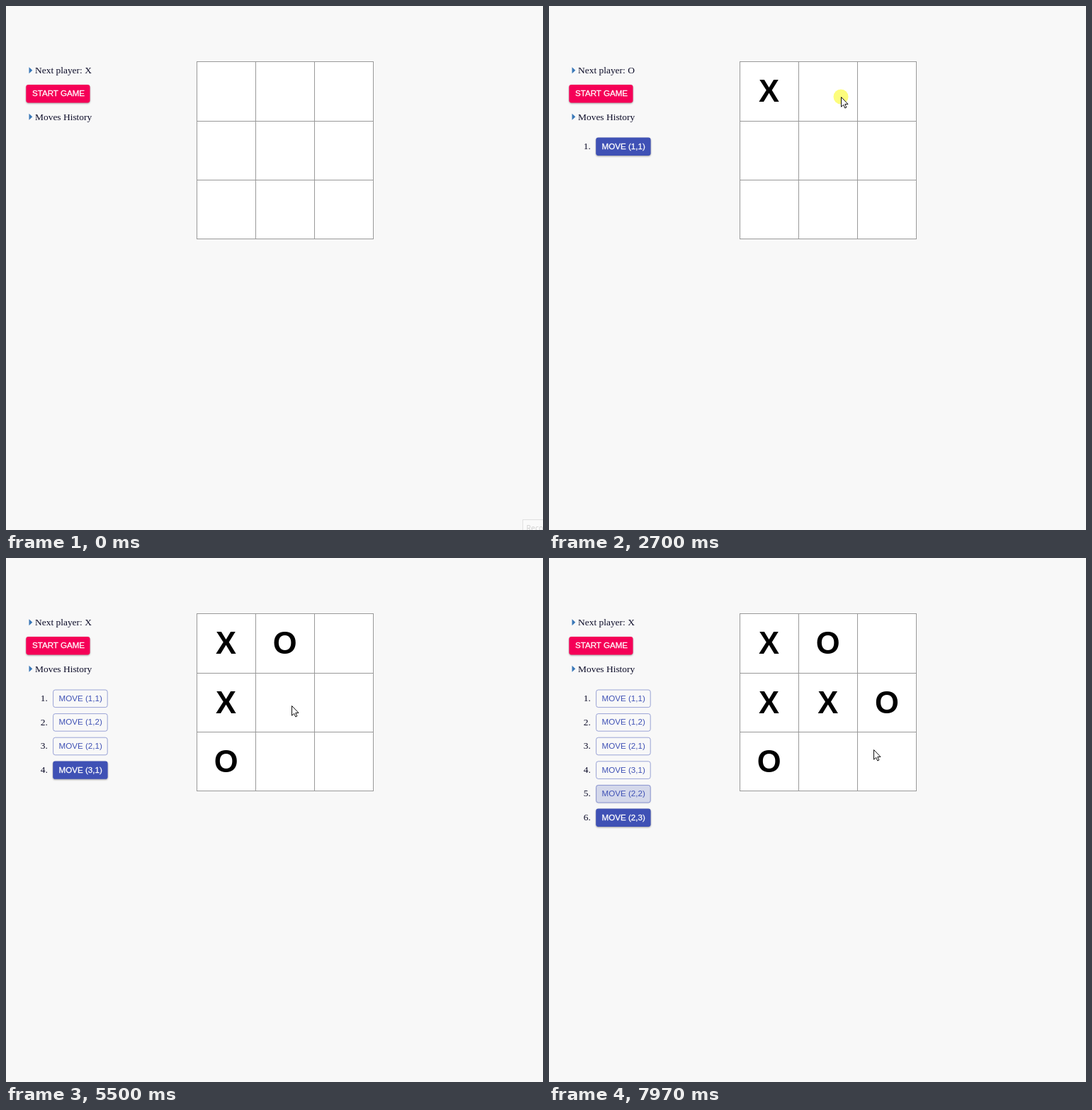
Recreate the animation shown at these times as an HTML page. Size 758 by 739 pixels, loop 8 s.

```html
<!DOCTYPE html>
<html lang="en">
<head>
<meta charset="utf-8">
<title>Tic-tac-toe</title>
<style>
  html, body { margin: 0; width: 100%; height: 100%; overflow: hidden; background: #f8f8f8; }
  svg { display: block; }
  .serif { font: 13.44px "Liberation Serif", serif; fill: #0c0c28; }
  .label { font: 11.6px "Liberation Sans", sans-serif; fill: #3f51b5; }
  .label.light { fill: #fff; stroke: #fff; stroke-width: .3px; }
  .mark { font: bold 43.5px "Liberation Sans", sans-serif; text-anchor: middle; }
  .hint { font: 10.5px "Open Sans", sans-serif; fill: #cfcfcf; }
  .raised { filter: drop-shadow(0 1.2px 1.2px rgba(0, 0, 0, .36)); }
</style>
</head>
<body>
<svg id="stage" width="758" height="739" viewBox="0 0 758 739"></svg>
<script>
const LOOP = 8000;
const BLUE = '#3f51b5';
const BOARD = { x: 269, y: 78.9, pitch: 83.16 };
const ROW = 33.6;
const HOLD = 80;   // press to landing
const FADE = 250;  // filled to outlined button

const moves = [
  { row: 1, col: 1, press: 1705 },
  { row: 1, col: 2, press: 2650 },
  { row: 2, col: 1, press: 3950 },
  { row: 3, col: 1, press: 4800 },
  { row: 2, col: 2, press: 7120 },
  { row: 2, col: 3, press: 7750 }
];

// Pointer trips: when, where to, and an optional point the curve bends towards
const trips = [
  { from: 70, until: 200, to: [494, 647] },
  { from: 340, until: 1450, to: [311, 119], bend: [-175, 310] },
  { from: 1800, until: 2480, to: [412, 128] },
  { from: 2760, until: 3250, to: [317, 205], bend: [400, 215] },
  { from: 3460, until: 3660, to: [327, 214] },
  { from: 4030, until: 4670, to: [306, 289] },
  { from: 4900, until: 5500, to: [403, 208], bend: [340, 415] },
  { from: 5930, until: 6750, to: [403, 191], bend: [337, 810] },
  { from: 7200, until: 7550, to: [452, 214] },
  { from: 7830, until: 7970, to: [458, 270] }
];
trips.forEach((trip, i) => {
  trip.start = i ? trips[i - 1].to : [640, 700];
  trip.bend ||= trip.to.map((v, axis) => (v + trip.start[axis]) / 2);
});

const stage = document.getElementById('stage');

function add(tag, attrs, text = '', parent = stage) {
  const el = document.createElementNS('http://www.w3.org/2000/svg', tag);
  for (const key in attrs) el.setAttribute(key, attrs[key]);
  el.textContent = text;
  return parent.appendChild(el);
}

const write = (cls, x, y, text, parent) => add('text', { class: cls, x, y }, text, parent);

const show = (el, on) => { el.style.display = on ? '' : 'none'; };

const raised = (x, y, width, fill, parent) =>
  add('rect', { class: 'raised', x, y, width, height: 25.4, rx: 3.4, fill }, '', parent);

function summary(y, text) {
  add('path', { d: `M32.5 ${y - 8.7}l4.8 4.5l-4.8 4.5z`, fill: '#3a78b8' });
  return write('serif', 41, y, text);
}

function drawBoard() {
  const edge = (origin, k) => Math.floor(origin + BOARD.pitch * k) + .5;
  const [x0, x3] = [edge(BOARD.x, 0), edge(BOARD.x, 3)];
  const [y0, y3] = [edge(BOARD.y, 0), edge(BOARD.y, 3)];
  let d = '';
  for (let k = 0; k < 4; k++) {
    d += `M${edge(BOARD.x, k)} ${y0 - .5}V${y3 + .5}M${x0 - .5} ${edge(BOARD.y, k)}H${x3 + .5}`;
  }
  add('rect', { x: x0, y: y0, width: x3 - x0, height: y3 - y0, fill: '#fff' });
  add('path', { d, stroke: '#999', fill: 'none' });
}

const status = summary(95, 'Next player: X');
raised(28.3, 111, 90.2, '#f50057');
write('label light', 37, 127, 'START GAME');
summary(160.5, 'Moves History');
drawBoard();

moves.forEach((m, i) => {
  const dy = ROW * i;
  m.land = m.press + HOLD;
  m.mark = write('mark',
    BOARD.x + BOARD.pitch * (m.col - .5),
    BOARD.y + BOARD.pitch * (m.row - .5) + 14.9,
    i % 2 ? 'O' : 'X');
  m.item = add('g', {});
  write('serif', 48.7, 202 + dy, `${i + 1}.`, m.item);
  m.outline = add('rect', {
    x: 66.6, y: 186 + dy, width: 76.6, height: 24.6, rx: 3,
    fill: 'none', stroke: BLUE, 'stroke-opacity': .5
  }, '', m.item);
  m.fill = raised(66.2, 185.6 + dy, 77.4, BLUE, m.item);
  m.label = write('label', 74.6, 201.8 + dy, `MOVE (${m.row},${m.col})`, m.item);
});

const tip = add('g', {});
add('rect', { x: 729.5, y: 724.5, width: 60, height: 30, fill: '#fafafa', stroke: '#e0e0e0' }, '', tip);
write('hint', 734.5, 740, 'Recor', tip);

const pointer = add('g', {});
const glow = add('circle', { r: 10.5, fill: '#fdfd7c' }, '', pointer);
add('path', {
  d: 'M.5 .5V14.2L3.7 11.3L5.8 16L7.9 15L5.8 10.4H10Z', fill: '#fff', stroke: '#111'
}, '', pointer);

const clamp = v => Math.min(1, Math.max(0, v));
const smooth = k => k * k * (3 - 2 * k);

function locate(t) {
  const trip = trips.findLast(p => t >= p.from) || trips[0];
  const k = smooth(clamp((t - trip.from) / (trip.until - trip.from)));
  return trip.to.map((end, axis) =>
    trip.start[axis] * (1 - k) ** 2 + 2 * trip.bend[axis] * k * (1 - k) + end * k * k);
}

function draw(t) {
  const count = moves.filter(m => t >= m.land).length;
  status.textContent = 'Next player: ' + (count % 2 ? 'O' : 'X');

  moves.forEach((m, i) => {
    const latest = i === count - 1;
    const next = moves[i + 1];
    const faded = next ? clamp((t - next.land) / FADE) : 0;
    show(m.mark, i < count);
    show(m.item, i < count);
    show(m.outline, !latest);
    m.fill.setAttribute('opacity', (1 - faded) ** 2);
    m.label.classList.toggle('light', latest);
  });

  show(tip, t < 70);
  show(pointer, t >= 70);
  show(glow, moves.some(m => t >= m.press && t < m.land));
  pointer.setAttribute('transform', `translate(${locate(t)})`);
}

const start = performance.now();
function tick() {
  draw((performance.now() - start) % LOOP);
  requestAnimationFrame(tick);
}
tick();
</script>
</body>
</html>
```
